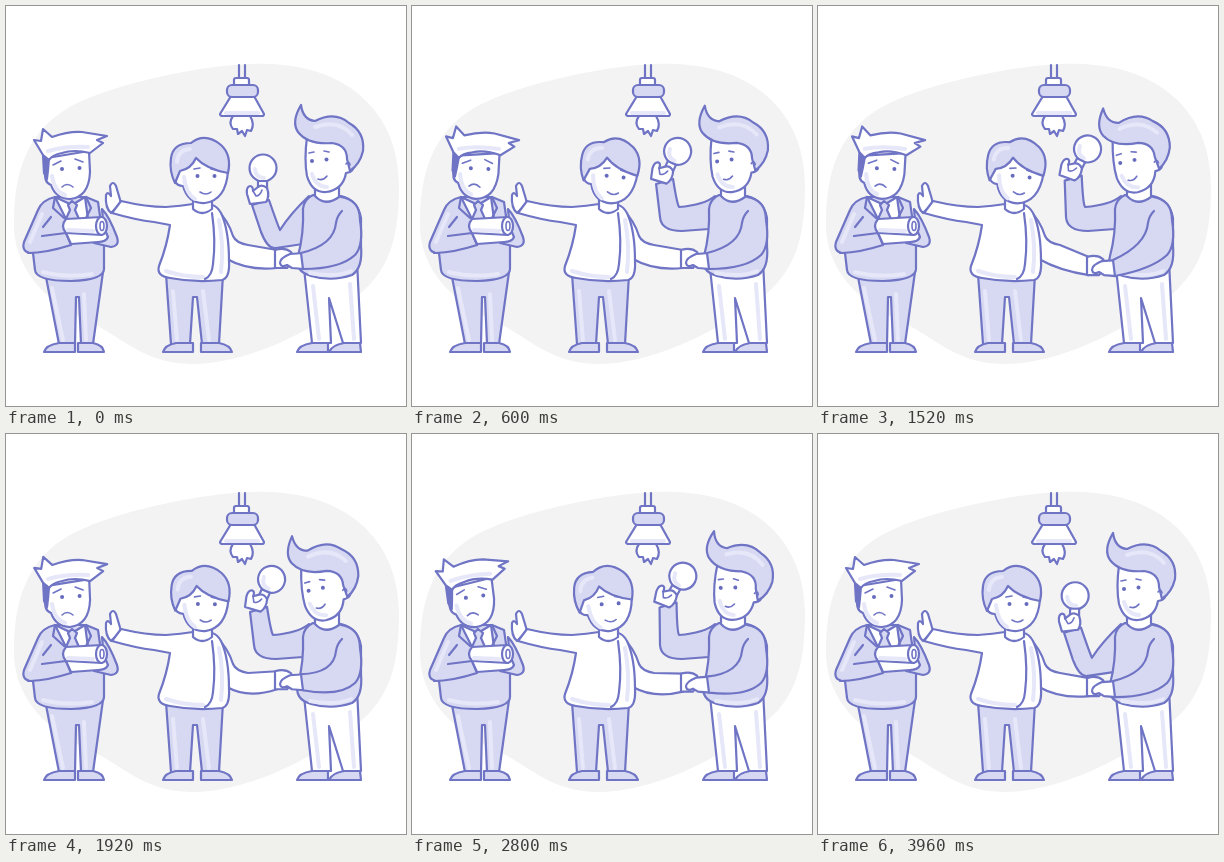
An HTML page that plays this animation: 400 px wide and 400 px high, repeating every 4000 ms.

```html
<!DOCTYPE html>
<html lang="en">
<head>
<meta charset="utf-8">
<title>Changing the bulb</title>
<style>
html, body { margin: 0; width: 100%; height: 100%; overflow: hidden; background: #fff; }
svg { display: block; width: 100vw; height: 100vh; }
.ink { stroke: #6f74c5; stroke-width: 2.2; stroke-linecap: round; stroke-linejoin: round; fill: none; }
.w { fill: #fff; }
.l { fill: #d7d8f1; }
.pale { stroke: #e6e7f8; stroke-width: 4; }
.dot { fill: #666bbd; stroke: none; }
.thin { stroke-width: 1.6; }
</style>
</head>
<body>
<svg viewBox="0 0 400 400">
  <path fill="#f3f3f3" d="M8 222C7 165 22 126 62 102C105 78 205 56 262 58C340 60 393 105 393 180C393 236 382 268 345 295C300 328 240 358 185 358C140 357 120 335 92 320C40 298 10 265 8 222Z"/>

  <!-- lamp -->
  <g class="ink">
    <path d="M233 59V72M239 59V72"/>
    <path class="w" d="M227 110Q222 117 227 123L231 123L232 128L236 125L239 130L241 124L245 125Q249 118 244 110Z"/>
    <rect class="w" x="228" y="72" width="15" height="8" rx="2"/>
    <path class="w" d="M225 90L214 108Q214 110 217 110H256Q258 110 258 108L248 90Z"/>
    <path class="pale" d="M220 107H252"/>
    <rect class="l" x="221" y="79" width="31" height="12" rx="5"/>
  </g>

  <!-- man with the plans -->
  <g class="ink">
    <path class="l" d="M39 266L53 338H69L70 291H73L75 338H87L97 266Z"/>
    <path class="pale" d="M46 282L57 334M78 288L80 334"/>
    <path class="l" d="M38 346Q40 339 53 337H69V346ZM72 346V337H87Q97 339 98 346Z"/>
    <path class="l" d="M49 191Q36 194 32 204L18 236Q15 247 27 247L29 264Q30 275 65 275Q98 274 98 263V238L92 196L80 191Z"/>
    <path class="pale" d="M36 208L24 236M37 266Q60 272 86 268"/>
    <path class="w" d="M49 191L60 213H82L79 191L66 199Z"/>
    <path class="l" d="M62 199L66 195L71 199L69 204L73 213H60L64 204Z"/>
    <path d="M49 191L47 202L58 212M80 191L85 202L80 212M37 221L45 211"/>
    <path class="l" d="M96 203Q103 210 111 231Q114 240 105 241L88 237L98 224Z"/>
    <path class="l" d="M22 247Q40 247 65 239L60 227L36 230"/>
    <path class="w" d="M60 227L65 238L92 236Q100 236 102 231L99 224L80 225Z"/>
    <path class="w" d="M60 213L96 211V229L60 227Q54 220 60 213Z"/>
    <path class="pale" d="M62 224L87 225"/>
    <ellipse class="w" cx="95.500" cy="220" rx="5.500" ry="9"/>
    <ellipse class="thin" cx="96" cy="220" rx="2" ry="4.500"/>
    <g id="headA">
      <path class="w" d="M41 152L40 164Q37 176 45 179Q50 193 64 193Q83 191 84 166L83 145Z"/>
      <path class="pale" d="M46 170Q48 185 59 189"/>
      <path fill="#6f74c5" d="M37 149L38 167L41 173L42 164L43 152Z"/>
      <path class="w" d="M37 149L34 144L28 134L35 135L37 123L46 131Q63 125 76 126L101 130L91 134L97 137L84 147Q68 143 56 147Q46 149 43 154Z"/>
      <path class="pale" d="M42 145Q60 140 82 141"/>
      <path class="thin" d="M47 159L55 155M69 153L77 156M56 181Q61 176 67 181"/>
      <circle class="dot" cx="56" cy="163" r="2"/><circle class="dot" cx="73.500" cy="162" r="2"/>
    </g>
  </g>

  <!-- man in the middle -->
  <g class="ink">
    <path class="l" d="M160 268L165 338H184L187 291H191L196 338H213L217 268Z"/>
    <path class="pale" d="M167 285L171 334M197 285L203 334"/>
    <path class="l" d="M157 346Q159 339 170 337H187V346ZM195 346V337H213Q224 339 226 346Z"/>
    <path id="reach" class="w"/>
    <path id="palm" class="w" d="M105 207Q99 202 100 189Q102 185 105 190L104 180Q107 174 110 180L113 190L115 197Z"/>
    <path id="torso" class="w"/>
    <path class="pale" d="M160 265Q178 271 197 271M213 214Q218 240 215 266"/>
    <path d="M206 207Q210 235 207 258Q206 270 199 273"/>
    <path class="w" d="M187 190V203Q196 211 206 203V190Z"/>
    <g id="headB">
      <path class="w" d="M172 164Q167 168 169 175Q171 180 177 180Q182 198 199 197Q220 194 222 165L185 148Z"/>
      <path class="pale" d="M178 171Q180 188 189 193"/>
      <path class="l" d="M169 177Q163 165 165 152Q167 137 185 137Q199 126 215 139Q226 149 222 167Q200 163 190 152Q185 163 174 165Z"/>
      <path class="pale" d="M171 156Q172 144 184 143"/>
      <path class="thin" d="M188 163L194 162M205 163L210 164M194 186Q200 190 205 186"/>
      <circle class="dot" cx="191.500" cy="170" r="2"/><circle class="dot" cx="208.500" cy="170" r="2"/>
    </g>
  </g>

  <!-- man with the bulb -->
  <g class="ink">
    <path class="w" d="M298 262L306 337H325L323 292L337 337H355L351 255Z"/>
    <path class="pale" d="M307 280L313 333M344 278L348 333"/>
    <path class="l" d="M291 346Q293 339 306 337H322V346ZM323 346Q326 339 338 337H354L355 346Z"/>
    <path id="lift" class="l"/>
    <g id="grip">
      <circle class="w" cx="5" cy="-27" r="13.500"/>
      <path class="pale" d="M-3 -26Q-2 -17 6 -17"/>
      <path class="w" d="M0 -14H9V-6H0Z"/>
      <path class="w" d="M-8 9L-11 -1Q-12 -8 -8 -9Q-5 -9 -5 -4L0 -8Q4 -11 9 -7Q12 1 8 7Z"/>
      <path class="thin" d="M-5 -4L-2 1Q2 1 4 -5"/>
    </g>
    <path class="l" d="M307 189Q298 193 297 203Q298 228 292 250Q288 265 305 270Q326 276 346 269Q357 262 355 240V212Q352 194 335 190Z"/>
    <path class="pale" d="M304 267Q328 272 345 265"/>
    <path id="handB" class="w" d="M269 -10Q279 -13 285 -8L288 -2L281 8H269Z"/>
    <path id="handC" class="w" d="M298 -7L284 -6Q274 -2 274 3Q275 8 281 5L286 8L298 9Z"/>
    <path id="forearm" class="l"/>
    <path class="w" d="M309 180V190Q319 201 333 191V178Z"/>
    <g id="headC">
      <path class="w" d="M301 131Q298 154 301 170Q306 187 320 186Q337 184 340 167Q350 166 347 155L342 140Z"/>
      <path class="pale" d="M306 168Q310 181 321 181"/>
      <path class="l" d="M295 99Q297 114 309 115Q329 105 343 117Q359 126 357 145Q354 158 344 165L341 153Q341 139 326 137Q302 139 292 126Q285 116 295 99Z"/>
      <path class="pale" d="M309 121Q332 113 346 129"/>
      <path class="thin" d="M303 147L308 146M318 145L323 146M312 173Q317 175 321 170M340 158Q343 154 344 159"/>
      <circle class="dot" cx="306" cy="155" r="2"/><circle class="dot" cx="320.500" cy="153.500" r="2"/>
    </g>
  </g>
</svg>
<script>
const LOOP = 4000, STEP = 40;
const put = (id, name, value) => document.getElementById(id).setAttribute(name, value);
const move = (id, x, y, turn = 0) => put(id, 'transform', `translate(${x} ${y}) rotate(${turn})`);
const spin = (id, angle, x, y) => put(id, 'transform', `rotate(${angle} ${x} ${y})`);
const mix = (a, b, k) => a + (b - a) * k;

// Smooth 0 to 1 between two times.
function ease(t, from, to) {
  const p = Math.min(1, Math.max(0, (t - from) / (to - from)));
  return (1 - Math.cos(Math.PI * p)) / 2;
}
// Smooth 0 to 1 and back around a moment.
const pulse = (t, at, half) => ease(t, at - half, at) - ease(t, at, at + half);

function drawHeads(t) {
  const out = ease(t, 0, 600), over = ease(t, 1600, 2200), back = ease(t, 2800, LOOP);
  spin('headA', 6 * out - 10.5 * over + 4.5 * back, 65, 190);
  spin('headB', 6 * out - 9.5 * over + 3.5 * back, 196, 200);
  spin('headC', -6.3 * ease(t, 400, 1040) + 10.7 * ease(t, 1800, 2600) - 4.4 * back, 322, 190);
}

function drawPush(t) {
  const push = pulse(t, 1060, 440) + pulse(t, 2360, 440);
  const dx = 8 * push, dy = -2 * push;
  move('palm', dx, dy);
  spin('palm', 0, 0, 0);
  put('palm', 'transform', `translate(${dx} ${dy}) rotate(${10 * push} 110 202)`);
  put('torso', 'd', `M187 198Q175 200 160 201Q140 201 ${115 + dx} ${195 + dy}L${106 + dx} ${207 + dy}` +
    'Q130 214 148 216L164 219Q161 240 153 260Q150 270 164 272Q190 277 216 274Q224 272 223 255Q223 224 215 207Q211 200 206 199');
}

function drawShake(t) {
  const phase = t < 3400 ? (Math.max(t, 600) - 1000) / 400 : (t - 3400) / 600;
  const depth = t < 1000 ? 10 : 10 + 14 * Math.exp((1400 - t) / 600);
  const y = 244 + depth * (1 - Math.cos(Math.PI * phase)) / 2;
  move('handB', 0, y);
  move('handC', 0, y);
  put('reach', 'd', `M211 204Q222 214 227 230Q230 237 242 239L271 ${y - 10}V${y + 8}Q242 265 221 253`);
  put('forearm', 'd', `M335 191Q354 194 354 214Q358 239 349 249Q334 263 297 ${y + 9}` +
    `L295 ${y - 7}Q328 239 330 217Q331 210 336 205`);
}

function drawBulb(t) {
  const up = ease(t, 0, 600) - ease(t, 3400, LOOP);
  const twist = up * (1 - Math.cos(2 * Math.PI * (t - 550) / 1400)) / 2;
  const x = 252 - 2 * up + 4 * twist, y = 189 - 21 * up - 5 * twist;
  const inner = `${mix(274, 267, up)} ${mix(224, 201, up)}`;
  const elbow = `${mix(262, 249, up)} ${mix(244, 225, up)}`;
  put('lift', 'd', `M${x - 6} ${y + 10}L${mix(255, 248, up)} ${mix(226, 211, up)}Q${elbow} 270 ${mix(242, 225, up)}` +
    `L297 ${mix(238, 223, up)}L303 190Q${mix(284, 292, up)} ${mix(208, 199, up)} ${inner}` +
    `Q${mix(272, 265, up)} ${mix(220, 198, up)} ${x + 11} ${y + 5}Z`);
  move('grip', x, y, 24 * up + 5 * twist);
}

function draw(t) {
  drawHeads(t);
  drawPush(t);
  drawShake(t);
  drawBulb(t);
}

const start = performance.now();
function tick(now) {
  const t = Math.max(0, now - start) % LOOP;
  draw(Math.floor(t / STEP) * STEP);
  requestAnimationFrame(tick);
}
draw(0);
requestAnimationFrame(tick);
</script>
</body>
</html>
```
